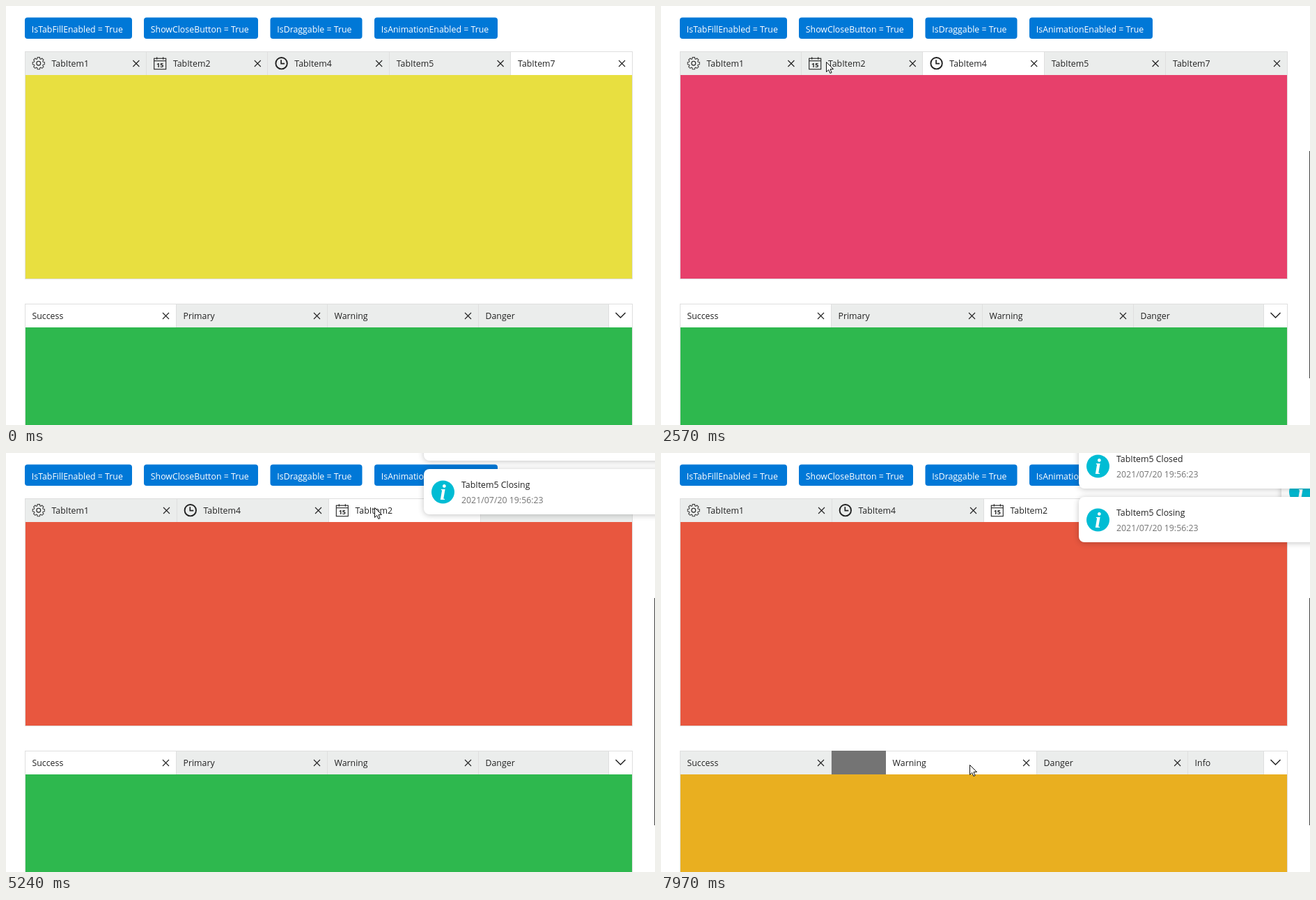
An HTML page with a canvas for the animation above (8 s loop, 932 px wide and 601 px high).

```html
<!DOCTYPE html>
<html lang="en">
<head>
<meta charset="utf-8">
<title>Tab control demo</title>
<style>
html, body { margin: 0; width: 100%; height: 100%; overflow: hidden; background: #fff; }
canvas { display: block; width: 932px; height: 601px; }
</style>
</head>
<body>
<canvas id="stage" width="932" height="601"></canvas>
<script>
const ctx = document.getElementById('stage').getContext('2d');
const LOOP = 8000, LEFT = 27.5, RIGHT = 899.5, STRIP = 33.5;
const FONT = '12.35px "Open Sans", "Noto Sans", sans-serif';
const INK = '#222', LINE = '#dfdfdf', IDLE = '#ebedec', GAP = '#747474';
const YELLOW = '#e8df40', RED = '#e8573f', PINK = '#e7406b';
const GREEN = '#2eb84e', BLUE = '#326cf3', AMBER = '#e9af20';

// Moments of interaction, in ms
const PICK_2 = 540, PICK_4 = 1120, GRAB = 2760, SWAP_4 = 3203, SWAP_5 = 3553, DROP = 4010;
const CLOSE_5 = 4700, PICK_PRIMARY = 6880, CLOSE_PRIMARY = 7765;
const CLICKS = [PICK_2, PICK_4, CLOSE_5, PICK_PRIMARY, CLOSE_PRIMARY - 80];
const SLIDE = 200, GRIP = 73;
const W5 = (RIGHT - LEFT) / 5, W4 = (RIGHT - LEFT) / 4, WB = 217;

// Pointer moves: start, end, then the place it reaches
const MOVES = [
  [70, 540, 296, 87], [610, 900, 409, 90], [1680, 2200, 167, 68],
  [2300, 2570, 237, 80], [2570, 2760, 275, 87], [3010, 3900, 671, 88],
  [3900, 4430, 529, 78], [5640, 5860, 511, 86], [6180, 6750, 330, 446],
  [7000, 7680, 443, 447]
];

const clamp = v => Math.max(0, Math.min(1, v));
const mix = (a, b, p) => a + (b - a) * p;
const ramp = (t, start, length) => clamp((t - start) / length);
const smooth = p => p * p * (3 - 2 * p);
const easeOut = p => 1 - (1 - p) ** 3;

function pointerAt(t) {
  return MOVES.reduce(([x, y], [start, end, toX, toY]) => {
    const p = smooth(ramp(t, start, end - start));
    return [mix(x, toX, p), mix(y, toY, p)];
  }, [932, 170]);
}

function box(x, y, w, h, color) {
  ctx.fillStyle = color;
  ctx.fillRect(x, y, w, h);
}

function rounded(x, y, w, h, r, color) {
  ctx.fillStyle = color;
  ctx.beginPath();
  ctx.roundRect(x, y, w, h, r);
  ctx.fill();
}

function disc(x, y, r, color) {
  ctx.fillStyle = color;
  ctx.beginPath();
  ctx.arc(x, y, r, 0, 7);
  ctx.fill();
}

function text(str, x, y, color = INK, font = FONT, align = 'left') {
  ctx.font = font;
  ctx.fillStyle = color;
  ctx.textAlign = align;
  ctx.fillText(str, x, y);
}

function poly(points, width = 1.1, color = INK) {
  ctx.beginPath();
  points.forEach(([x, y]) => ctx.lineTo(x, y));
  ctx.strokeStyle = color;
  ctx.lineWidth = width;
  ctx.stroke();
}

function ring(x, y, r, width) {
  ctx.beginPath();
  ctx.arc(x, y, r, 0, 7);
  ctx.strokeStyle = INK;
  ctx.lineWidth = width;
  ctx.stroke();
}

const icons = {
  gear(x, y) {
    const teeth = [];
    for (let i = 0; i <= 8; i++) {
      for (const [turn, r] of [[-.3, 6.7], [-.19, 8.7], [.19, 8.7], [.3, 6.7]]) {
        const a = i * Math.PI / 4 + turn;
        teeth.push([x + r * Math.sin(a), y - r * Math.cos(a)]);
      }
    }
    poly(teeth, 1.1, '#444');
    ring(x, y, 2.9, 1.1);
  },
  calendar(x, y) {
    ctx.strokeStyle = INK;
    ctx.lineWidth = 1.1;
    ctx.strokeRect(x - 8.5, y - 7, 17, 15.5);
    poly([[x - 8.5, y - 3.5], [x + 8.5, y - 3.5]]);
    for (const dx of [-4.5, 4.5]) poly([[x + dx, y - 9], [x + dx, y - 5.5]]);
    text('15', x, y + 6, INK, 'bold 9px "Open Sans", sans-serif', 'center');
  },
  clock(x, y) {
    ring(x, y, 8.2, 1.9);
    poly([[x - .5, y - 5], [x - .5, y + .5], [x + 4.5, y + .5]], 1.7);
  }
};

function cross(x, y) {
  const r = 4.5;
  poly([[x - r, y - r], [x + r, y + r]]);
  poly([[x + r, y - r], [x - r, y + r]]);
}

function drawTab({ name, icon, x, w, on }, y) {
  const from = Math.round(x), to = Math.round(x + w), mid = y + 17;
  box(from, y - .5, to - from, STRIP + .5, on ? '#fff' : IDLE);
  box(from, y - .5, to - from, 1, LINE);
  box(to - 1, y - .5, 1, STRIP + .5, LINE);
  if (icon) icons[icon](x + 19.3, mid - .3);
  text(name, x + (icon ? 38 : 10), y + 21.8);
  cross(x + w - 15, mid);
}

function drawPane(y, h, tabs, right, color) {
  ctx.strokeStyle = LINE;
  ctx.lineWidth = 1;
  ctx.strokeRect(LEFT, y, RIGHT - LEFT, h);
  box(LEFT + .5, y + STRIP, RIGHT - LEFT - 1, h - STRIP - .5, color);
  ctx.save();
  ctx.beginPath();
  ctx.rect(LEFT + .5, y - .5, right - LEFT - 1, STRIP + .5);
  ctx.clip();
  box(LEFT, y - .5, right - LEFT, STRIP + .5, GAP);
  // The active tab lies on top of its neighbours
  [...tabs].sort((a, b) => a.on - b.on).forEach(tab => drawTab(tab, y));
  ctx.restore();
}

function topPane(t) {
  const closed = t >= CLOSE_5;
  const active = t < PICK_2 ? 7 : t >= PICK_4 && t < GRAB ? 4 : 2;
  const shut = ramp(t, CLOSE_5, SLIDE);
  const swap4 = ramp(t, SWAP_4, SLIDE), swap5 = ramp(t, SWAP_5, SLIDE);
  const w = closed ? W4 : W5;

  const held = Math.max(LEFT + W5, pointerAt(Math.min(t, DROP))[0] - GRIP);
  const x2 = t < GRAB ? LEFT + W5 : mix(held, LEFT + 3 * W5, ramp(t, DROP, SLIDE));

  const tab = (n, x, icon) => ({ name: 'TabItem' + n, icon, x, w, on: n === active });
  const tabs = [
    tab(1, LEFT, 'gear'),
    tab(4, mix(LEFT + W5 * (2 - swap4), LEFT + W4, shut), 'clock'),
    tab(2, mix(x2, LEFT + 2 * W4, shut), 'calendar'),
    tab(7, mix(LEFT + 4 * W5, LEFT + 3 * W4, shut))
  ];
  if (!closed) tabs.push(tab(5, LEFT + W5 * (3 - swap5)));
  drawPane(65.5, 326, tabs, RIGHT, { 2: RED, 4: PINK, 7: YELLOW }[active]);
}

function bottomPane(t) {
  const closed = t >= CLOSE_PRIMARY;
  const active = closed ? 2 : t >= PICK_PRIMARY ? 1 : 0;
  const shift = WB * ramp(t, 7843, SLIDE);
  const tabs = ['Success', 'Primary', 'Warning', 'Danger', 'Info']
    .map((name, i) => ({ name, x: LEFT + i * WB - (i > 1 ? shift : 0), w: WB, on: i === active }))
    .filter(tab => !closed || tab.name !== 'Primary');
  drawPane(427.5, 190, tabs, 865.5, [GREEN, BLUE, AMBER][active]);
  box(865, 427, 1, STRIP + .5, LINE);
  poly([[875.5, 440], [882.5, 447], [889.5, 440]], 1.5);
}

function card(x, y, title, stamp) {
  ctx.save();
  ctx.shadowColor = 'rgba(0,0,0,.24)';
  ctx.shadowBlur = 9;
  ctx.shadowOffsetY = 1;
  rounded(x, y, 350, 65, 8, '#fff');
  ctx.restore();
  disc(x + 27.5, y + 33, 16.5, '#00bcd4');
  text('i', x + 27.5, y + 44, '#fff', 'italic bold 32px "Liberation Serif", serif', 'center');
  text(title, x + 54, y + 27);
  text(stamp, x + 54, y + 48.7, '#757575');
}

function notices(t) {
  if (t < CLOSE_5) return;
  const stamp = '2021/07/20 19:56:2';
  const x = mix(940, 600, easeOut(ramp(t, CLOSE_5 + 60, 440)));
  const drop = 40 * ramp(t, 7840, 130);
  const x3 = mix(940, 891, ramp(t, 7910, 60));
  if (x3 < 940) card(x3, 23, 'Primary Closing', stamp + '5');
  card(x, drop - 54, 'TabItem5 Closed', stamp + '3');
  card(x, drop + 23, 'TabItem5 Closing', stamp + '3');
}

function pointer(t) {
  const [x, y] = pointerAt(t);
  const pressed = t >= GRAB && t < DROP || CLICKS.some(c => t >= c && t < c + 80);
  if (pressed) disc(x, y - 1.5, 13, 'rgba(248,226,48,.66)');
  const shape = [[0, 0], [0, 14], [3.2, 11], [5.4, 16], [7.6, 15], [5.5, 10.2], [10, 10]];
  ctx.beginPath();
  shape.forEach(([dx, dy]) => ctx.lineTo(x + dx + .5, y + dy + .5));
  ctx.closePath();
  ctx.fillStyle = '#fff';
  ctx.fill();
  ctx.strokeStyle = '#111';
  ctx.lineWidth = 1;
  ctx.stroke();
}

const BUTTONS = [
  [27, 154, 'IsTabFillEnabled'], [198, 164, 'ShowCloseButton'],
  [379.5, 132, 'IsDraggable'], [529, 177, 'IsAnimationEnabled']
];

function draw(t) {
  box(0, 0, 932, 601, '#fff');
  for (const [x, w, name] of BUTTONS) {
    rounded(x, 16.5, w, 30.5, 4, '#0078d7');
    text(name + ' = True', x + 9.8, 37.5, '#fff');
  }
  topPane(t);
  bottomPane(t);
  notices(t);
  if (t >= 70) {
    box(931, 208, 1, 326, '#444');
    pointer(t);
  }
}

const begin = performance.now();
function tick() {
  draw((performance.now() - begin) % LOOP);
  requestAnimationFrame(tick);
}
tick();
</script>
</body>
</html>
```
